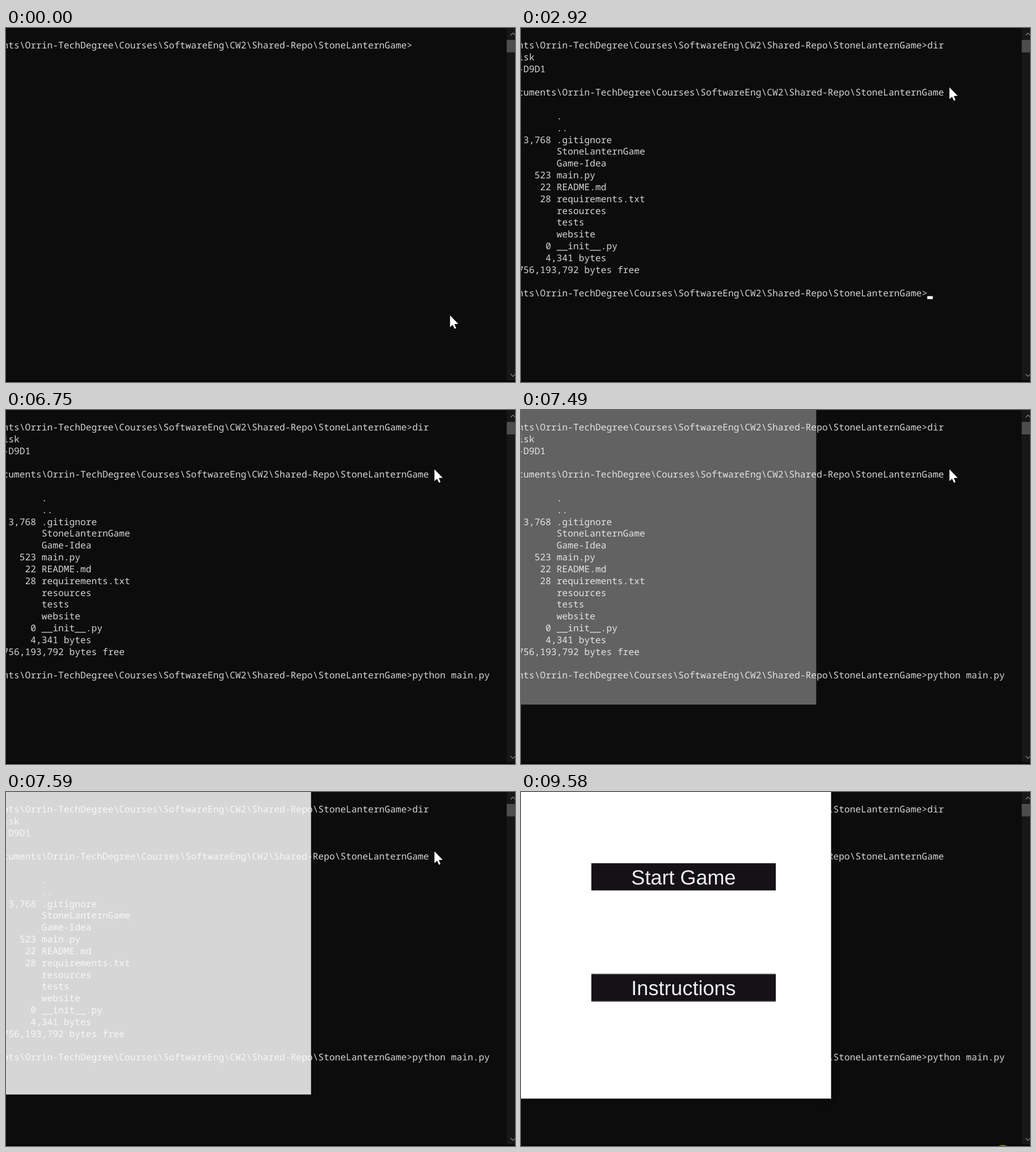
Animation of 897x624 px, one loop 9.83 s. Source, as an HTML page with a canvas:

```html
<!DOCTYPE html>
<html lang="en">
<head>
<meta charset="utf-8">
<title>Terminal session</title>
<style>
  html, body { margin: 0; width: 100%; height: 100%; overflow: hidden; background: #0c0c0c; }
  canvas { display: block; }
</style>
</head>
<body>
<canvas id="stage" width="897" height="624"></canvas>
<script>
const ctx = document.getElementById('stage').getContext('2d');
const LOOP = 9830;
const CELL = { w: 9.75, h: 20.83, left: -5.5, baseline: 36 };

const project = 'StoneLanternGame';
const path = `\\Orrin-TechDegree\\Courses\\SoftwareEng\\CW2\\Shared-Repo\\${project}`;
const prompt = `nts${path}>`;
const entry = (size, name) => `${size.padStart(6)} ${name}`;
const listing = [
  'isk', '-D9D1', '', `cuments${path}`, '',
  entry('', '.'), entry('', '..'), entry('3,768', '.gitignore'),
  entry('', project), entry('', 'Game-Idea'),
  entry('523', 'main.py'), entry('22', 'README.md'), entry('28', 'requirements.txt'),
  entry('', 'resources'), entry('', 'tests'), entry('', 'website'),
  entry('0', '__init__.py'), '     4,341 bytes', '756,193,792 bytes free'
];

// Key press times in ms, one per character
const dirKeys = [2450, 2560, 2670];
const runKeys = [3910, 4030, 4170, 4290, 4410, 4560, 4770,
                 5160, 5320, 5480, 5640, 5820, 6000, 6100];
const LISTED = 2920;
const caretSpans = [[1910, 3450], [3910, 5050], [5160, 6340]];

const OPEN = 7490, READY = 7900, BLUR = 9580;
const moves = [
  { from: 30, to: 820, pts: [[782.5, 507], [722, 240], [743, 184]] },
  { from: 2070, to: 2380, pts: [[743, 184], [750, 140], [755, 105]] },
  { from: 8010, to: 8510, pts: [[755, 105], [772, 230], [768, 363]] },
  { from: 8740, to: 9190, pts: [[768, 363], [790, 490], [834, 632]] }
];
const clicks = [
  { from: 1370, to: 1580, x: 743.5, y: 183.5 },
  { from: BLUR, to: LOOP, x: 849, y: 638.4 }
];

const clamp = v => Math.max(0, Math.min(1, v));
const ease = u => u * u * (3 - 2 * u);
const within = (t, a, b) => t >= a && t < b;
const typed = (text, keys, t) => text.slice(0, keys.filter(k => t >= k).length);

function rect(color, x, y, w, h) {
  ctx.fillStyle = color;
  ctx.fillRect(x, y, w, h);
}

function poly(points) {
  ctx.beginPath();
  points.forEach(([x, y]) => ctx.lineTo(x, y));
}

function drawRow(text, row) {
  ctx.fillText(text, CELL.left, CELL.baseline + row * CELL.h);
}

function drawTerminal(t) {
  rect('#0c0c0c', 0, 0, 897, 624);
  ctx.font = '16.25px "Noto Sans Mono", monospace';
  ctx.textAlign = 'left';
  ctx.fillStyle = '#d4d4d4';
  let line = prompt + typed('dir', dirKeys, t);
  let row = 0;
  drawRow(line, row);
  if (t >= LISTED) {
    listing.forEach((text, i) => drawRow(text, i + 1));
    line = prompt + typed('python main.py', runKeys, t);
    row = 21;
    drawRow(line, row);
  }
  if (caretSpans.some(([a, b]) => within(t, a, b))) {
    rect('#ffffff', CELL.left + line.length * CELL.w, 35.2 + row * CELL.h, CELL.w, 5.2);
  }
}

function drawScrollbar() {
  rect('#171717', 882.4, 0, 14.6, 622);
  rect('#4d4d4d', 882.4, 21, 14.6, 22);
  ctx.strokeStyle = '#858585';
  ctx.lineWidth = 1.2;
  poly([[889.3, 13], [893.5, 8.8], [897.7, 13]]);
  ctx.stroke();
  poly([[889.3, 610], [893.5, 614.2], [897.7, 610]]);
  ctx.stroke();
  rect('#050505', 0, 621.5, 897, 2.5);
}

function drawButton(label, y) {
  rect('#151217', 124, y, 325, 49);
  rect('#8c868a', 124, y, 325, 1);
  rect('#8c868a', 124, y + 48, 325, 1);
  ctx.font = '36px "Liberation Sans", Arial, sans-serif';
  ctx.textAlign = 'center';
  ctx.fillStyle = '#f0f0f0';
  ctx.fillText(label, 286.4, y + 37.5);
}

function drawWindow(t) {
  if (t < OPEN) return;
  const age = t - OPEN;
  const shrink = age > 330 ? 0 : Math.exp(-age / 93);
  const right = 546.5 - 26.5 * shrink;
  const bottom = 540.5 - 21.5 * shrink;
  const alpha = clamp(0.35 + age / 210);
  ctx.save();
  ctx.globalAlpha = alpha;
  if (alpha === 1) {
    ctx.shadowColor = t < BLUR ? 'rgba(0,0,0,.55)' : 'rgba(0,0,0,.3)';
    ctx.shadowBlur = 14;
    ctx.shadowOffsetY = 3;
  }
  rect('#ffffff', -40, -40, right + 40, bottom + 40);
  ctx.restore();
  if (t >= BLUR) {
    rect('#777777', 546, 0, 1, 541);
    rect('#777777', 0, 540, 547, 1);
  }
  if (t >= READY) {
    drawButton('Start Game', 125);
    drawButton('Instructions', 320.5);
  }
}

function pointerAt(t) {
  const move = moves.filter(m => t >= m.from).pop() || moves[0];
  const u = ease(clamp((t - move.from) / (move.to - move.from)));
  const [a, b, c] = move.pts;
  return [0, 1].map(i => (1 - u) ** 2 * a[i] + 2 * u * (1 - u) * b[i] + u * u * c[i]);
}

function drawPointer(t) {
  for (const c of clicks) {
    if (!within(t, c.from, c.to)) continue;
    ctx.fillStyle = 'rgba(255,255,0,.47)';
    ctx.beginPath();
    ctx.arc(c.x, c.y, 16.5, 0, Math.PI * 2);
    ctx.fill();
  }
  const [x, y] = pointerAt(t);
  ctx.save();
  ctx.translate(x, y);
  poly([[0, -0.5], [0, 20.3], [4.7, 16.2], [8, 23.2], [10.8, 22], [7.7, 15.1], [14.5, 14.5]]);
  ctx.closePath();
  ctx.strokeStyle = '#000000';
  ctx.lineWidth = 1.6;
  ctx.stroke();
  ctx.fillStyle = '#ffffff';
  ctx.fill();
  ctx.restore();
}

function draw(t) {
  ctx.textRendering = 'geometricPrecision';
  drawTerminal(t);
  drawScrollbar();
  drawWindow(t);
  drawPointer(t);
}

const start = performance.now();
function tick() {
  draw((performance.now() - start) % LOOP);
  requestAnimationFrame(tick);
}
tick();
</script>
</body>
</html>
```
